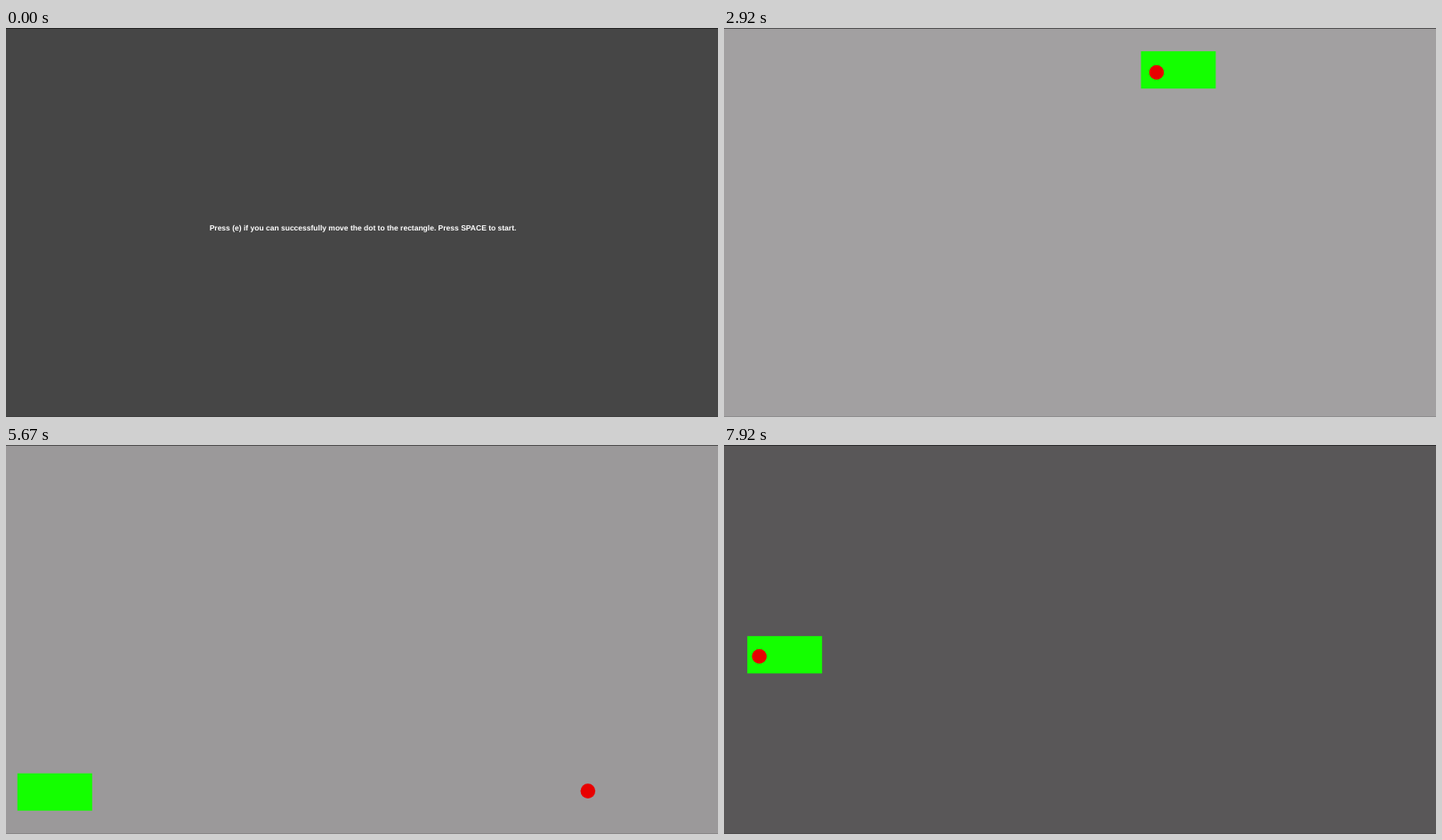
Animation, 800 px wide and 438 px high, one loop 8000 ms. Source, as an HTML page:

```html
<!DOCTYPE html>
<html lang="en">
<head>
<meta charset="utf-8">
<title>Move the dot to the rectangle</title>
<style>
  html, body { margin: 0; width: 100%; height: 100%; overflow: hidden; background: #464646; }
  svg { display: block; width: 100%; height: 100%; }
  text { font: bold 8.5px "Liberation Sans", Arial, sans-serif; text-rendering: geometricPrecision; }
</style>
</head>
<body>
<svg viewBox="0 0 800 438">
  <rect id="back" width="800" height="438" fill="#464646"/>
  <rect width="800" height="1" fill="#000" opacity=".5"/>
  <rect y="437" width="800" height="1" fill="#000" opacity=".12"/>
  <text id="intro" x="401" y="228" text-anchor="middle" fill="#fff">Press (e) if you can successfully move the dot to the rectangle. Press SPACE to start.</text>
  <g id="trial">
    <rect id="goal" width="84" height="42" fill="#14ff00"/>
    <circle id="dot" r="8.3" fill="#e80000"/>
  </g>
</svg>
<script>
const FPS = 12, LENGTH = 8000, START = 17;

const easeOut = p => 1 - (1 - p) ** 1.7;
const smooth = p => p * p * (3 - 2 * p);

// Each trial shows a goal, then the dot travels one Bezier curve from where it rests.
const home = [295, 198];
const trials = [
  { shown: START, goal: [468.5, 26.2], move: [18, 29], ease: easeOut,
    bends: [[400, 340], [360, 100]], end: [486, 50] },
  { shown: 38, goal: [628, 403.3], move: [42, 52], ease: smooth,
    bends: [[640, 170], [700, 310]], end: [664, 392] },
  { shown: 67, goal: [12.8, 369.7], move: [67, 79.5], ease: smooth,
    bends: [[480, 348], [150, 294]], end: [72, 393] },
  { shown: 84, goal: [26.2, 215.2], move: [87, 94], ease: smooth,
    bends: [[70, 310], [-10, 260]], end: [39.7, 238] }
];

const $ = id => document.getElementById(id);
const back = $("back"), intro = $("intro"), trial = $("trial"), goal = $("goal"), dot = $("dot");

function set(el, attrs) {
  for (const name in attrs) el.setAttribute(name, attrs[name]);
}

function bezier(a, b, c, d, u) {
  const v = 1 - u;
  return a * v ** 3 + 3 * b * v * v * u + 3 * c * v * u * u + d * u ** 3;
}

function dotAt(i, step) {
  const { move: [from, to], ease, bends: [b, c], end } = trials[i];
  const a = i ? trials[i - 1].end : home;
  const p = Math.min(1, Math.max(0, (step - from) / (to - from)));
  return [0, 1].map(k => bezier(a[k], b[k], c[k], end[k], ease(p)));
}

// Brightness rises and falls as a triangle wave.
function shade(step) {
  if (step < START) return "rgb(70,70,70)";
  const v = Math.round(198 - 29.4 * Math.abs(step / FPS - 4.17));
  return `rgb(${v + 1},${v - 1},${v})`;
}

function draw(ms) {
  const step = Math.floor(ms % LENGTH * FPS / 1000 + 0.001);
  const started = step >= START;
  set(back, { fill: shade(step) });
  set(intro, { visibility: started ? "hidden" : "visible" });
  set(trial, { visibility: started ? "visible" : "hidden" });
  if (!started) return;
  const i = trials.filter(t => t.shown <= step).length - 1;
  const [x, y] = trials[i].goal;
  set(goal, { x, y });
  const [cx, cy] = dotAt(i, step);
  set(dot, { cx, cy });
}

const begin = performance.now();
function tick() {
  draw(performance.now() - begin);
  requestAnimationFrame(tick);
}
tick();
</script>
</body>
</html>
```
